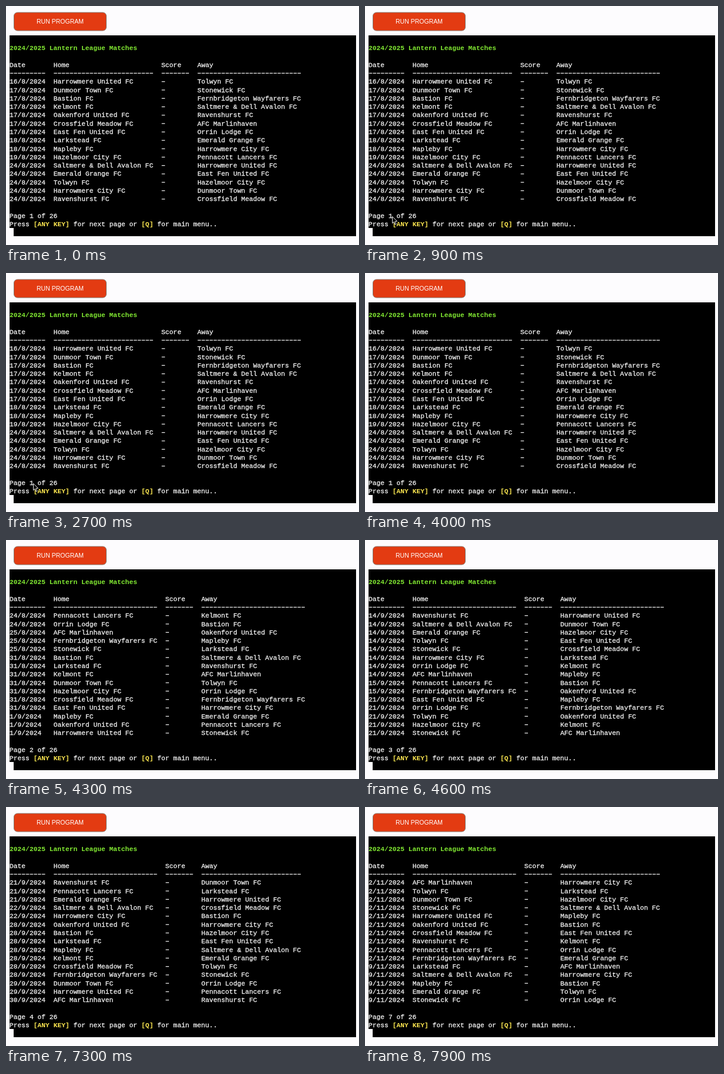
Write an HTML page with a canvas that moves like this. It is 600 px wide and 407 px high and loops after 8000 ms.

```html
<!DOCTYPE html>
<html lang="en">
<head>
<meta charset="utf-8">
<title>Match list</title>
<style>
  html, body { margin: 0; width: 100%; height: 100%; overflow: hidden; background: #fdfcfe; }
  canvas { display: block; width: 600px; height: 407px; }
</style>
</head>
<body>
<canvas id="stage"></canvas>
<script>
const LOOP = 8000, W = 600, H = 407;
const LEFT = 6, CELL = 6.79, TOP = 71.4, PITCH = 14.29;
const WHITE = '#f4f4f4', GREEN = '#82ea32', YELLOW = '#fbe650';
const MONO = '"Liberation Mono", monospace';

const teams = {
  H: 'Harrowmere United FC', h: 'Harrowmere City FC', T: 'Tolwyn FC',
  D: 'Dunmoor Town FC', S: 'Stonewick FC', B: 'Bastion FC',
  F: 'Fernbridgeton Wayfarers FC', K: 'Kelmont FC', A: 'Saltmere & Dell Avalon FC',
  O: 'Oakenford United FC', R: 'Ravenshurst FC', C: 'Crossfield Meadow FC',
  M: 'AFC Marlinhaven', E: 'East Fen United FC', L: 'Orrin Lodge FC',
  k: 'Larkstead FC', G: 'Emerald Grange FC', m: 'Mapleby FC',
  z: 'Hazelmoor City FC', P: 'Pennacott Lancers FC'
};

// Each day lists its matches as home/away letter pairs.
const pages = [
  { at: 0, no: 1, days: '16/8 HT|17/8 DS BF KA OR CM EL|18/8 kG mh|19/8 zP|24/8 AH GE Tz hD RC' },
  { at: 4200, no: 2, days: '24/8 PK LB|25/8 MO Fm Sk|31/8 BA kR KM DT zL CF Eh|1/9 mG OP HS' },
  { at: 4400, no: 3, days: '14/9 RH AD Gz TE SC hk LK Mm|15/9 PB FO|21/9 Em LF TO zK SM' },
  { at: 5000, no: 4, days: '21/9 RD Pk GH|22/9 AC hB|28/9 Oh Bz kE mA KG CT FS|29/9 DL HP|30/9 MR' },
  { at: 7400, no: 7, days: '2/11 Mh Tk Dz SA Hm OB CE RK PL FG|9/11 kM Ah mB GT SL' }
];

for (const page of pages) {
  page.rows = page.days.split('|').flatMap(day => {
    const [date, ...pairs] = day.split(' ');
    return pairs.map(([home, away]) => [date + '/2024', teams[home], '-', teams[away]]);
  });
  const widest = i => Math.max(...page.rows.map(row => row[i].length));
  page.widths = [9, widest(1), 7, widest(3)];
}

const canvas = document.getElementById('stage');
const ctx = canvas.getContext('2d');
const ratio = window.devicePixelRatio || 1;
canvas.width = W * ratio;
canvas.height = H * ratio;
ctx.scale(ratio, ratio);

function put(text, row, col = 0, color = WHITE, bold = false) {
  const x = LEFT + col * CELL, y = TOP + row * PITCH;
  ctx.fillStyle = ctx.strokeStyle = color;
  if (/^-+$/.test(text)) {
    for (let i = 0; i < text.length; i++) ctx.fillRect(x + i * CELL + 0.6, y - 0.4, 5.6, 1.2);
    return;
  }
  ctx.font = (bold ? 'bold ' : '') + CELL / 0.6001 + 'px ' + MONO;
  ctx.fillText(text, x, y + 3.7);
  if (!bold) {
    ctx.lineWidth = 0.3;
    ctx.strokeText(text, x, y + 3.7);
  }
}

function putRow(cells, row, widths) {
  let col = 0;
  cells.forEach((cell, i) => {
    put(cell, row, col);
    col += widths[i] + 2;
  });
}

function drawFrame() {
  ctx.fillStyle = '#fdfcfe';
  ctx.fillRect(0, 0, W, H);
  ctx.fillStyle = '#000';
  ctx.fillRect(6, 50, 589, 328);
  ctx.fillRect(13, 377, 582, 15);

  ctx.beginPath();
  ctx.roundRect(13.5, 11, 157, 31, 6);
  ctx.fillStyle = '#e33b12';
  ctx.fill();
  ctx.strokeStyle = '#85776f';
  ctx.lineWidth = 1;
  ctx.stroke();
  ctx.fillStyle = '#fff';
  ctx.font = '10.5px "Liberation Sans", sans-serif';
  ctx.textAlign = 'center';
  ctx.fillText('RUN PROGRAM', 92, 30.2);
  ctx.textAlign = 'left';
}

function drawPage({ no, rows, widths }) {
  put('2024/2025 Lantern League Matches', 0, 0, GREEN, true);
  putRow(['Date', 'Home', 'Score', 'Away'], 2, widths);
  putRow(widths.map(n => '-'.repeat(n)), 3, widths);
  rows.forEach((row, i) => putRow(row, 4 + i, widths));
  put(`Page ${no} of 26`, 20);
  put('Press', 21);
  put('[ANY KEY]', 21, 6, YELLOW, true);
  put('for next page or', 21, 16);
  put('[Q]', 21, 33, YELLOW, true);
  put('for main menu..', 21, 37);
}

function drawPointer(t) {
  if (t < 100 || t >= 3500) return;
  const left = 1 - Math.min((t - 100) / 200, 1);
  ctx.save();
  ctx.translate(46.5 + 14 * left, 358.5 + 14 * left);
  ctx.beginPath();
  for (const [x, y] of [[0, 0], [0, 11.5], [2.7, 9], [4.7, 13.8], [6.6, 13], [4.6, 8.3], [8.2, 8.2]]) ctx.lineTo(x, y);
  ctx.closePath();
  ctx.fillStyle = '#000';
  ctx.fill();
  ctx.strokeStyle = '#e8e8e8';
  ctx.lineWidth = 1;
  ctx.stroke();
  ctx.restore();
}

function draw(now) {
  const t = now % LOOP;
  drawFrame();
  drawPage(pages.findLast(page => t >= page.at));
  drawPointer(t);
  requestAnimationFrame(draw);
}

const start = performance.now();
draw(0);
function tick() { return performance.now() - start; }
</script>
</body>
</html>
```
